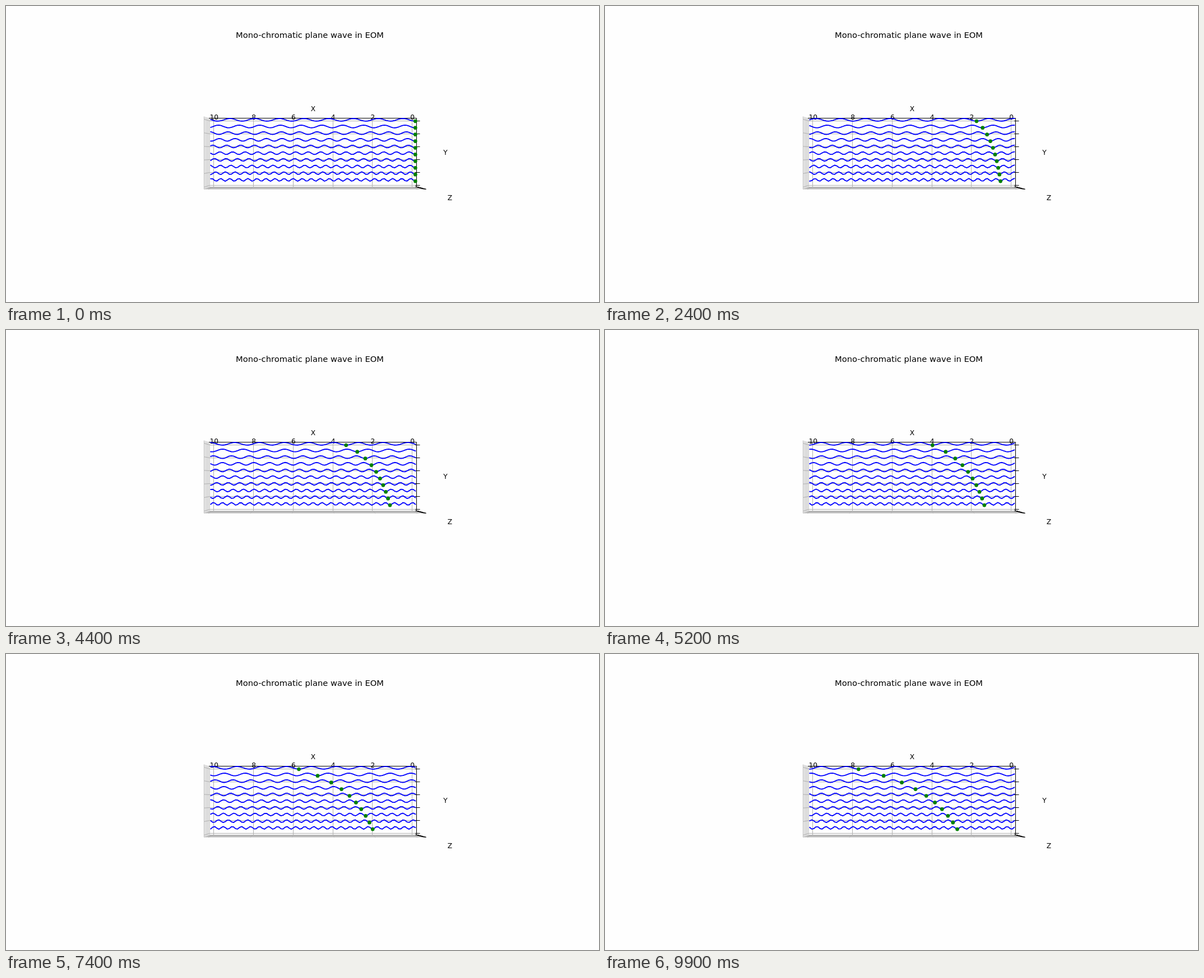
Write an HTML page that moves like this. It is 1058 px wide and 529 px high and loops after 10 s.

```html
<!DOCTYPE html>
<html lang="en">
<head>
<meta charset="utf-8">
<title>Plane wave</title>
<style>
  html, body { margin: 0; width: 100%; height: 100%; overflow: hidden; background: #fefefe; }
  svg { display: block; width: 1058px; height: 529px; }
  text { font: 12.25px "DejaVu Sans", sans-serif; text-anchor: middle; }
  .title { font-size: 14.7px; }
  path { fill: none; }
  .grid { stroke: #b0b0b0; }
  .axis { stroke: #000; }
  .wave { stroke: #00f; stroke-width: 1.84; stroke-linecap: square; stroke-linejoin: round; }
  circle { fill: #008000; }
</style>
</head>
<body>
<svg id="stage" viewBox="0 0 1058 529"></svg>
<script>
const stage = document.getElementById('stage');

function add(tag, attributes, text = '') {
  const node = document.createElementNS('http://www.w3.org/2000/svg', tag);
  for (const [key, value] of Object.entries(attributes)) node.setAttribute(key, value);
  node.textContent = text;
  return stage.appendChild(node);
}
const line = (kind, x1, y1, x2, y2) => add('path', { class: kind, d: `M${x1} ${y1}L${x2} ${y2}` });
const label = (text, x, y, kind = '') => add('text', { x, y, class: kind }, text);
const pixel = v => Math.floor(v) + 0.5;

// Box: back wall, side wall and floor in slight perspective
for (let i = 0; i < 6; i++) {
  const x = pixel(370.5 + 70.85 * i);
  const y = pixel(205.3 + 23.1 * i);
  line('grid', x, 200.5, x, 323);
  line('grid', x, 323, 547.5 + (x - 547.5) * 1.054, 327.5);
  line('grid', 363.5, y, 732, y);
  line('grid', 353.5, 262 + (y - 262) * 1.054, 363.5, y);
}
for (let i = 0; i < 5; i++) {
  const x = 353.5 + 2.4 * i;
  line('grid', x, 197.5 + 0.7 * i, x, 327.5 - i);
  line('grid', x, 327 - 0.85 * i, 742 - 2.4 * i, 327 - 0.85 * i);
}

line('axis', 362, 200.5, 732.5, 200.5);
line('axis', 732.5, 200.5, 732.5, 323);
line('axis', 732, 323.3, 749.5, 327.3);
for (let i = 0; i < 6; i++) {
  const y = pixel(205.3 + 23.1 * i);
  line('axis', 730, y, 738.5, y);
  line('axis', 730 + 2.5 * i, 323 + 0.75 * i, 737 + 2.5 * i, 323.7 + 0.75 * i);
  label(10 - 2 * i, 371.3 + 70.75 * i, 202.5);
}
label('X', 548, 187.5);
label('Y', 784, 266);
label('Z', 792, 347);
label('Mono-chromatic plane wave in EOM', 542, 56.6, 'title');

// Equal frequency in every row, wave number rising downwards
const START = 730.3, SCALE = 36.5, AMPLITUDE = 2.4, OMEGA = 0.4, SAMPLES = 100;
const rows = Array.from({ length: 10 }, (_, i) => ({
  k: 5.2 + i,
  y: 203.4 + 11.92 * i,
  wave: add('path', { class: 'wave' })
}));
for (const row of rows) row.dot = add('circle', { r: 3.35, cy: row.y + AMPLITUDE });

function draw(now) {
  const phase = OMEGA * Math.floor(now % 10000 / 100);
  for (const { k, y, wave, dot } of rows) {
    const points = Array.from({ length: SAMPLES }, (_, j) => {
      const x = 10 * j / (SAMPLES - 1);
      return `${(START - SCALE * x).toFixed(2)} ${(y + AMPLITUDE * Math.cos(k * x - phase)).toFixed(2)}`;
    });
    wave.setAttribute('d', 'M' + points.join('L'));
    dot.setAttribute('cx', START - SCALE * phase / k);
  }
}
function tick() {
  draw(performance.now());
  requestAnimationFrame(tick);
}
tick();
</script>
</body>
</html>
```
